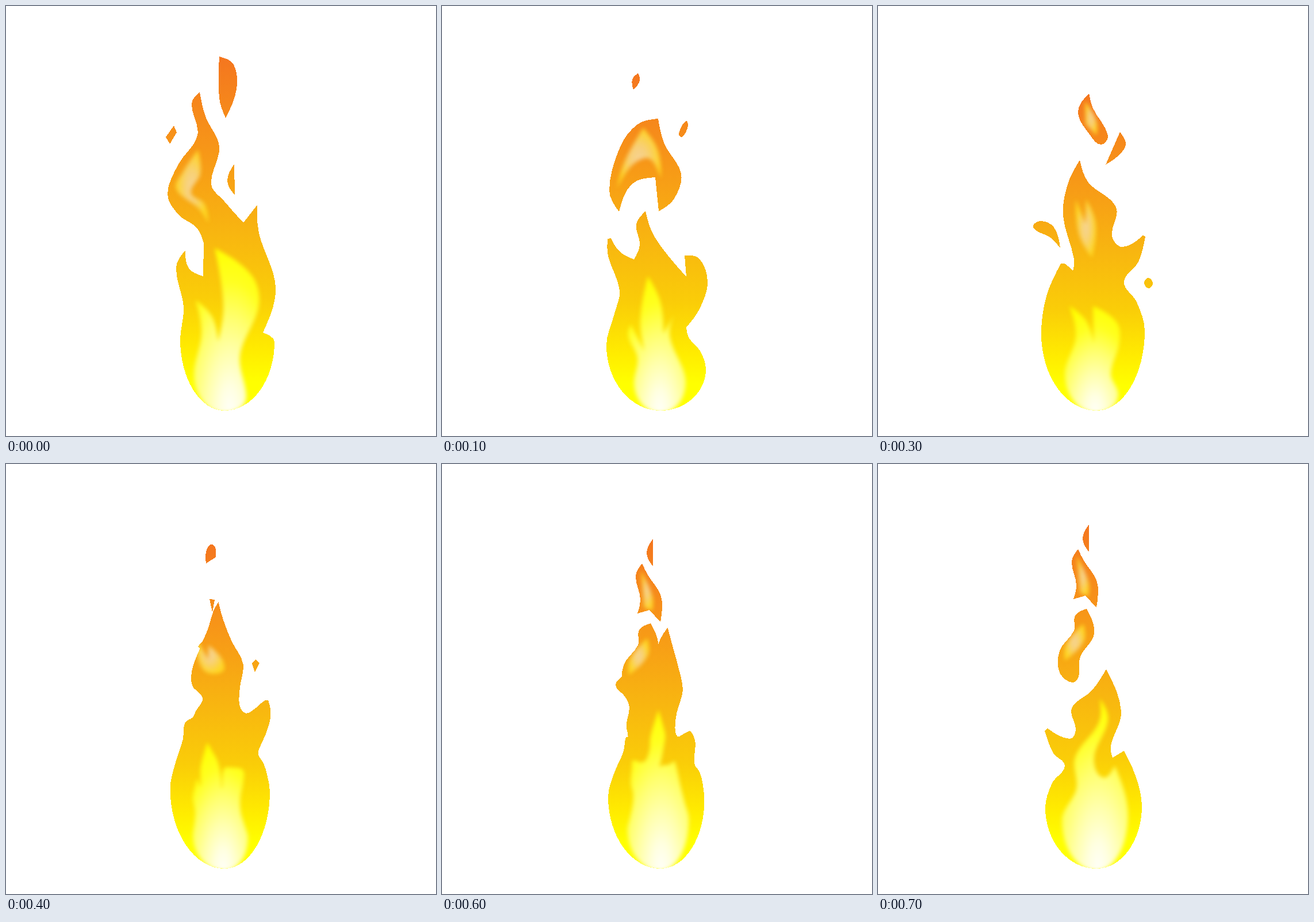
These frames come from a looping animation (748 px wide and 748 px high, 800 ms). An HTML page:

```html
<!DOCTYPE html>
<html lang="en">
<head>
<meta charset="utf-8">
<title>Flame</title>
<style>
  html, body { margin: 0; width: 100%; height: 100%; overflow: hidden; background: #fff; }
  svg { display: block; width: 100%; height: 100%; }
</style>
</head>
<body>
<svg id="stage" viewBox="0 0 748 748">
  <defs>
    <linearGradient id="fire" x1="0" y1="0" x2="0" y2="1">
      <stop offset="0" stop-color="#f4761f"/>
      <stop offset=".25" stop-color="#f79518"/>
      <stop offset=".5" stop-color="#f8b610"/>
      <stop offset=".68" stop-color="#facd08"/>
      <stop offset=".83" stop-color="#ffec00"/>
      <stop offset=".92" stop-color="#ff0"/>
    </linearGradient>
    <radialGradient id="heat" cx=".55" cy=".98" r="1">
      <stop offset="0" stop-color="#fffff8"/>
      <stop offset=".15" stop-color="#ffffe0"/>
      <stop offset=".35" stop-color="#ffffac"/>
      <stop offset=".55" stop-color="#ffff70"/>
      <stop offset=".78" stop-color="#ffff20"/>
      <stop offset="1" stop-color="#ff0"/>
    </radialGradient>
    <radialGradient id="shine">
      <stop offset="0" stop-color="#f6d9a0"/>
      <stop offset=".4" stop-color="#f8d682"/>
      <stop offset="1" stop-color="#ffdc26"/>
    </radialGradient>
    <filter id="soft" x="-30%" y="-30%" width="160%" height="160%" color-interpolation-filters="sRGB">
      <feGaussianBlur stdDeviation="3.5"/>
    </filter>
  </defs>
</svg>
<script>
const NS = 'http://www.w3.org/2000/svg';
const STEP = 100;
const BASE_X = 380, BODY_BASE = 704, GLOW_BASE = 708;
const stage = document.getElementById('stage');

// Key points run clockwise; "!" marks a sharp corner.
const parse = text => text.split(' ').map(s => {
  const [x, y] = s.split(',').map(parseFloat);
  return { x, y, sharp: s.endsWith('!') };
});

// body and glow go from their widest left point over the tips to the widest right one.
const pose = (body, glow, pieces, shines) => ({
  body: parse(body), glow: parse(glow), pieces: pieces.map(parse), shines: shines.map(parse)
});

const tall = pose(
  '303,580 309,525 296,455 312,425! 318,456 343,470! 344,412! 331,385 300,363 281,327 300,275 333,225 323,170 337,150! 347,192 371,245 357,310 380,340 413,377! 437,346! 440,395 469,490 447,568! 467,585',
  '327,640 340,570 330,512! 358,540 369,584! 378,520 363,421! 427,468 440,520 407,608 418,680',
  ['371,88! 396,102 401,145 382,195! 371,160', '292,208! 297,220! 285,240! 278,228!', '397,275! 398,329! 385,304'],
  ['334,250! 338,292 322,325 345,344 352,378! 335,352 296,318 307,290']);

const split = pose(
  '286,590 300,535 309,495 289,435 288,405! 294,404! 309,427 334,441! 344,415 338,380 354,357! 370,402 425,471! 422,434! 448,440 462,480 449,525 425,559! 430,578 449,600 459,632',
  '334,655 340,612 324,575 328,554! 352,600! 345,545 358,470! 380,515 385,570! 416,517! 396,570 424,655',
  ['308,358! 291,320 310,245 340,206 376,196! 387,240 416,292 404,335 377,357! 371,298! 330,310',
    '341,117! 344,130 333,146! 331,128', '424,200 428,208 418,228 412,222'],
  ['350,212! 375,250 381,300! 352,265 304,318! 318,270']);

const low = pose(
  '296,630 308,592 338,548 313,508 310,480 325,440! 338,480 364,510! 371,465 391,410 368,351! 415,369 446,412 426,468 440,510 461,550 432,596! 436,606! 458,595! 465,625',
  '320,645 355,590 370,535 404,512! 394,540 413,590 386,640 386,690! 418,625! 420,670',
  ['348,319! 333,275 352,213 369,150! 400,170 408,212 393,265 392,305! 375,275 375,247! 351,275',
    '330,315 336,323 335,361! 319,332', '457,361 476,392 472,422! 467,422! 447,376', '288,479 298,490 296,512 306,545! 273,507'],
  ['401,378! 430,410 405,468! 404,420', '377,185! 381,248! 357,250!']);

const wide = pose(
  '284,570 293,505 318,448! 326,449 339,461! 341,440 322,365 330,310 351,268! 366,307 414,350 407,400 425,419 461,399! 465,401! 453,445 428,480 450,515 464,565',
  '325,640 344,575 333,522! 362,548 376,588! 374,522! 415,550 420,585 405,640 418,675',
  ['367,152! 374,178 400,225 388,241 370,226 348,185', '421,219! 430,245 396,276! 403,260',
    '283,374 306,385 317,421! 300,403 270,385', '470,473 478,482 471,491 463,482'],
  ['362,336! 379,380 372,438! 349,395 344,336! 361,379!', '360,165! 380,200 380,225! 361,205!']);

const forked = pose(
  '287,560 300,505 322,455 317,424! 332,433! 338,412 358,372 345,347 309,310 307,267 327,217! 343,240 347,270 357,280 374,260 380,225 388,212! 400,270 418,345 398,425 411,455 430,437 447,412! 460,475 439,525! 448,528! 454,540 454,575',
  '325,650 328,600 311,560 321,522! 337,570! 340,510 367,447! 378,495 375,560! 388,520 410,492! 405,545 424,625',
  ['356,115 364,120 365,137! 348,148! 348,128', '354,210! 363,211! 359,233!', '434,315! 441,321! 433,337! 428,322!'],
  ['330,276! 352,315! 352,290! 380,330 350,338 333,310']);

const broken = pose(
  '291,598 303,555 325,525 305,503 290,464! 295,460! 334,478 344,462 337,425 372,394 397,357! 423,430 405,490 408,511! 428,499! 449,545 459,595',
  '320,620 345,565 343,510 384,450 386,408! 400,445 376,510 390,545 412,525! 435,610',
  ['367,105! 367,153! 356,130', '348,148! 358,168 381,205 380,250! 361,229! 340,235! 345,210 337,170',
    '363,252! 376,295 352,335 344,378 317,365 316,325 341,290 343,264'],
  ['357,278! 358,308 325,342! 327,315', '346,160! 366,205 366,230! 352,225!']);

// Point at share u of a list of points.
function along(pts, u) {
  const f = u * (pts.length - 1), i = Math.min(Math.floor(f), pts.length - 2);
  return mix(pts[i], pts[i + 1], f - i);
}
const mix = (p, q, t) => ({ x: p.x + (q.x - p.x) * t, y: p.y + (q.y - p.y) * t });

// Halfway outline: both sides are matched from the base to the highest tip.
function halfway(a, b, count = 16) {
  const sides = pts => {
    const tip = pts.reduce((best, p, i) => p.y < pts[best].y ? i : best, 0);
    return [pts.slice(0, tip + 1), pts.slice(tip)];
  };
  const [la, ra] = sides(a), [lb, rb] = sides(b);
  const side = (p, q, from) => Array.from({ length: count + 1 - from }, (_, k) => {
    const u = (k + from) / count;
    return mix(along(p, u), along(q, u), .5);
  });
  const left = side(la, lb, 0);
  left[count].sharp = true;
  return left.concat(side(ra, rb, 1));
}

// Between two poses the loose pieces of the next one are still rising.
function between(a, b, lag = 25) {
  const lower = list => list.map(pts => pts.map(p => ({ ...p, y: p.y + lag })));
  return {
    body: halfway(a.body, b.body), glow: halfway(a.glow, b.glow),
    pieces: lower(b.pieces), shines: lower(b.shines)
  };
}

// Smooth curve through the points; with a base it is open and closed by a round bowl.
function smooth(pts, base) {
  const n = pts.length, last = pts[n - 1], first = pts[0];
  const at = i => pts[(i + n) % n];
  const handle = (i, len) => {
    const p = at(i);
    if (base && i === 0) return { x: p.x, y: p.y - len };
    if (base && i === n - 1) return { x: p.x, y: p.y + len };
    const a = at(i - 1), b = at(i + 1);
    const k = len / (Math.hypot(b.x - a.x, b.y - a.y) || 1);
    return { x: p.x + (b.x - a.x) * k, y: p.y + (b.y - a.y) * k };
  };
  let d = `M${first.x} ${first.y}`;
  for (let i = 0; i < (base ? n - 1 : n); i++) {
    const p = at(i), j = (i + 1) % n, q = at(j);
    const len = Math.hypot(q.x - p.x, q.y - p.y) / 3;
    let c1 = p.sharp ? p : handle(i, len);
    let c2 = q.sharp ? q : handle(j, -len);
    if (p.sharp && !q.sharp) c1 = mix(p, c2, .5);
    if (q.sharp && !p.sharp) c2 = mix(q, c1, .5);
    d += 'C' + [c1, c2, q].map(v => v.x.toFixed(1) + ' ' + v.y.toFixed(1)).join(' ');
  }
  if (base) {
    d += `A${last.x - BASE_X} ${base - last.y} 0 0 1 ${BASE_X} ${base}`;
    d += `A${BASE_X - first.x} ${base - first.y} 0 0 1 ${first.x} ${first.y}`;
  }
  return d + 'Z';
}

function add(parent, tag, attrs) {
  const el = document.createElementNS(NS, tag);
  for (const key in attrs) el.setAttribute(key, attrs[key]);
  return parent.appendChild(el);
}

const poses = [tall, split, low, wide, between(wide, forked), forked, between(forked, broken), broken];

const groups = poses.map((p, i) => {
  const group = add(stage, 'g', { visibility: 'hidden' });
  const d = smooth(p.body, BODY_BASE) + p.pieces.map(pts => smooth(pts)).join('');
  const clip = add(group, 'clipPath', { id: 'clip' + i });
  add(clip, 'path', { d, 'shape-rendering': 'crispEdges' });
  add(group, 'path', { d, fill: 'url(#fire)', 'shape-rendering': 'crispEdges' });
  const inner = add(group, 'g', { 'clip-path': `url(#clip${i})` });
  const light = (path, paint, opacity) =>
    add(inner, 'path', { d: path, fill: `url(#${paint})`, filter: 'url(#soft)', opacity });
  light(smooth(p.glow, GLOW_BASE), 'heat', 1);
  p.shines.forEach(pts => light(smooth(pts), 'shine', .9));
  return group;
});

let shown = -1;
function draw(time) {
  const now = Math.floor(Math.max(0, time) / STEP) % poses.length;
  if (now === shown) return;
  groups.forEach((g, i) => g.setAttribute('visibility', i === now ? 'visible' : 'hidden'));
  shown = now;
}

const start = performance.now();
function tick() {
  draw(performance.now() - start);
  requestAnimationFrame(tick);
}
draw(0);
requestAnimationFrame(tick);
</script>
</body>
</html>
```
